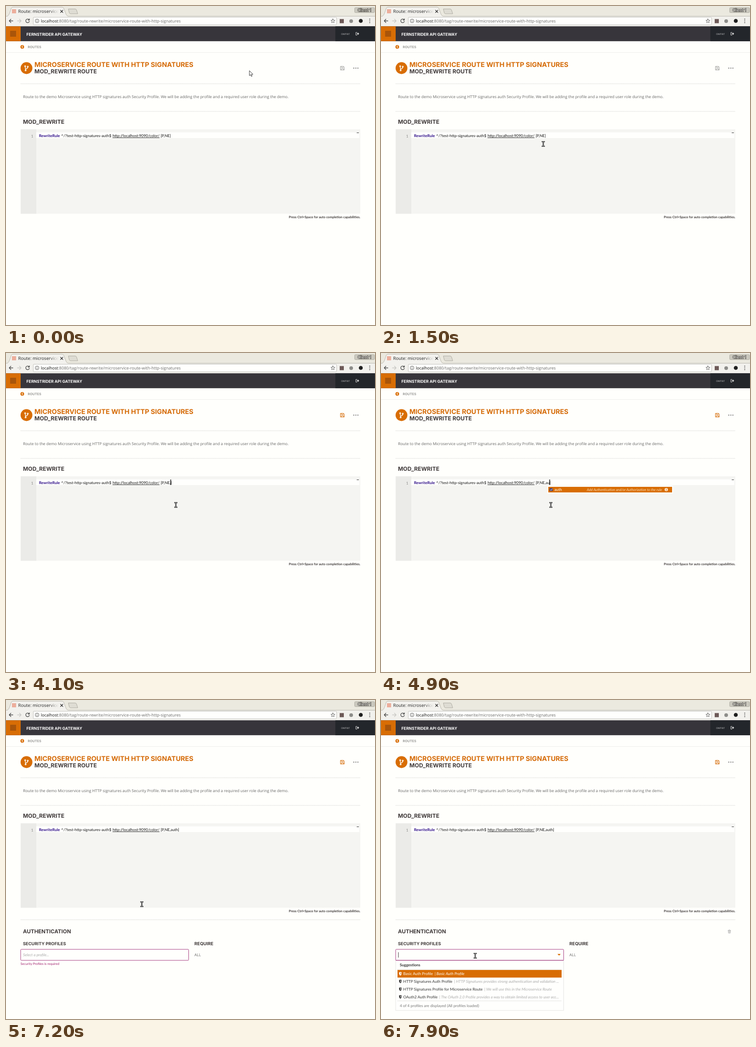
Animation of 805x696 px, one loop 8000 ms. Source, as an HTML page:

```html
<!DOCTYPE html>
<html lang="en">
<head>
<meta charset="utf-8">
<title>Route editor</title>
<style>
  html, body { margin: 0; width: 100%; height: 100%; overflow: hidden; background: #fffffc; }
  svg { display: block; width: 805px; height: 696px; text-rendering: geometricPrecision; }
  text { white-space: pre; }
  .head { font-family: Inter, sans-serif; font-weight: 700; fill: #413b3b; }
  .sans { font-family: "Open Sans", sans-serif; }
  .lato { font-family: Lato, sans-serif; font-size: 8.4px; fill: #111; }
  .b { font-weight: 700; }
  .i { font-style: italic; }
  .dots { stroke: #c9c9c6; stroke-width: 1; stroke-dasharray: 1.2 1.2; }
  .line { fill: none; stroke-linecap: round; stroke-linejoin: round; }
</style>
</head>
<body>
<svg viewBox="0 0 805 696">
  <defs>
    <linearGradient id="fade" gradientUnits="userSpaceOnUse" x1="94" x2="114" y1="0" y2="0">
      <stop stop-color="#222"/><stop offset="1" stop-color="#222" stop-opacity="0"/>
    </linearGradient>
    <g id="floppy" class="line" stroke="currentColor">
      <path d="M-4-4H2.4L4-2.4V4H-4Z M-2.2-4V-1.2H1.8V-4 M-2.4 4V1.2H2.4V4"/>
    </g>
    <path id="shield" d="M-2.8-3.4Q0-3.4 0-4Q0-3.4 2.8-3.4V0Q2.6 2.6 0 4Q-2.6 2.6-2.8 0Z"/>
    <path id="ibeam" d="M-2.3-5Q0-5 0-3.8Q0-5 2.3-5M0-4V4M-2.3 5Q0 5 0 3.8Q0 5 2.3 5"/>
  </defs>

  <!-- browser frame -->
  <rect width="805" height="22" fill="#ebe9df"/>
  <rect y="22" width="805" height="22.5" fill="#f2f1ed"/>
  <path d="M0 22.3H3Q6 21 8 15L11 6Q12 2.5 15 2.5H122Q125 2.5 126.5 6L131 18Q133 22.3 136 22.3H805" fill="#f2f1ed" stroke="#b5b2a8" stroke-width=".9"/>
  <path d="M136 6.5H151Q153 6.5 154 9L156.5 17H141Q139 17 138 15Z" fill="#dedcd3" stroke="#aaa79d" stroke-width=".9"/>
  <rect x="13" y="7" width="9" height="9" fill="#ecae9c"/>
  <text class="sans" x="26.5" y="15" font-size="9.6" fill="url(#fade)">Route: microservice</text>
  <path class="line" d="M119 9.3L124 14.3M124 9.3L119 14.3" stroke="#333" stroke-width="1.4"/>
  <rect x="760.5" y="3.5" width="43.5" height="11" rx="2" fill="#cbc9bf" stroke="#aaa79d" stroke-width=".8"/>
  <text id="badge" class="sans" x="782.5" y="12.3" font-size="8.8" text-anchor="middle" stroke="#55524b" stroke-width="1.8" paint-order="stroke">Client 1</text>

  <g class="line" stroke="#4a4a4a" stroke-width="1.3">
    <path d="M15 32.5H7M10.7 28.7L7 32.5L10.7 36.2"/>
    <path d="M25 32.5H33M29.3 28.7L33 32.5L29.3 36.2" stroke="#c9c8c4"/>
    <path d="M50.4 30A4 4 0 1 0 51 33.5M51 28V30.8H48"/>
  </g>
  <rect x="59.5" y="24.5" width="661.5" height="16.5" rx="1.5" fill="#fffffd" stroke="#bebdb8" stroke-width=".9"/>
  <circle cx="67.8" cy="32.5" r="4" fill="none" stroke="#555"/>
  <path d="M67.8 31.8V34.8M67.8 30V30.9" stroke="#555"/>
  <text class="sans" x="76" y="35.6" font-size="9" fill="#6a6a6a"><tspan fill="#111">localhost</tspan>:8080/tag/route-rewrite/microservice-route-with-http-signatures</text>
  <path class="line" d="M713.2 28L714.4 31.1L717.6 31.3L715.1 33.4L715.9 36.6L713.2 34.8L710.5 36.6L711.3 33.4L708.8 31.3L712 31.1Z" stroke="#555" stroke-width=".9"/>
  <rect x="728" y="28.5" width="9" height="9" fill="#6d5957"/>
  <circle cx="753" cy="33" r="4" fill="#8d8d8a"/>
  <circle cx="774" cy="32.5" r="4.3" fill="#1f1f1f"/>
  <g fill="#555"><circle cx="793.5" cy="28.7" r="1.1"/><circle cx="793.5" cy="32.5" r="1.1"/><circle cx="793.5" cy="36.3" r="1.1"/></g>

  <!-- app header -->
  <rect y="44.3" width="805" height="32.5" fill="#37353b"/>
  <rect x="718.5" y="44.3" width="86.5" height="32.5" fill="#23262b"/>
  <rect y="44.3" width="32" height="32.5" fill="#d86d04"/>
  <rect x="9" y="54" width="13" height="13" fill="#a9550a"/>
  <text class="head" x="44.5" y="64.7" font-size="8.7" style="fill:#fff">FERNSTRIDER API GATEWAY</text>
  <text class="sans" x="731" y="63" font-size="6.5" fill="#b4b4b6">owner</text>
  <path class="line" d="M765.5 57.6H763.3V63.6H765.5" stroke="#ddd"/>
  <path d="M765.4 59.6H767.4V57.6L770.4 60.6L767.4 63.6V61.6H765.4Z" fill="#ddd"/>
  <path d="M0 101.5H805" stroke="#eeeeea"/>
  <circle cx="35.5" cy="89.2" r="4" fill="#d86d04"/>
  <path class="line" d="M36.4 87.2L34.5 89.2L36.4 91.2" stroke="#fff" stroke-width="1.1"/>
  <text class="head" x="47.5" y="91.8" font-size="7.2" style="fill:#9b9b99">ROUTES</text>

  <!-- title -->
  <circle cx="44.7" cy="135.5" r="12.9" fill="#d86d04"/>
  <g class="line" stroke="#fff" stroke-width="1.4">
    <circle cx="41.8" cy="131.3" r="1.2"/><circle cx="47.5" cy="132.3" r="1.2"/><circle cx="42.8" cy="140.4" r="1.2"/>
    <path d="M42 132.8L42.7 139M47.5 133.6Q47.3 136 44.8 136.6Q42.8 137.2 42.7 139"/>
  </g>
  <text class="head" x="62" y="132.6" font-size="14.5" style="fill:#d56a05">MICROSERVICE ROUTE WITH HTTP SIGNATURES</text>
  <text class="head" x="62" y="146.8" font-size="12.3">MOD_REWRITE ROUTE</text>
  <use id="save" href="#floppy" x="734" y="135.7"/>
  <g fill="#999"><circle cx="758.7" cy="135.6" r="1.4"/><circle cx="763.2" cy="135.6" r="1.4"/><circle cx="767.7" cy="135.6" r="1.4"/></g>
  <path class="dots" d="M32 169.7H773M32 230H773"/>
  <text class="sans" x="37.3" y="201.4" font-size="8.45" fill="#666">Route to the demo Microservice using HTTP signatures auth Security Profile. We will be adding the profile and a required user role during the demo.</text>

  <!-- editor -->
  <text class="head" x="37" y="256.7" font-size="12.2">MOD_REWRITE</text>
  <rect x="32" y="269" width="741" height="184.3" fill="#f5f5f2"/>
  <rect x="32" y="269" width="34" height="184.3" fill="#ebebe8"/>
  <rect x="66" y="275.7" width="705" height="12.4" fill="#fffffd"/>
  <path d="M765 276.6H770" stroke="#444" stroke-width="1.1"/>
  <text class="lato" x="54.7" y="286.6" style="fill:#8a8a88">1</text>
  <text class="lato b" x="72" y="286" style="fill:#2b0a86">RewriteRule</text>
  <text class="lato" x="120.3" y="286">^/?test-http-signatures-auth$</text>
  <text class="lato" x="232.4" y="286" text-decoration="underline">http://localhost:9090/color/</text>
  <text class="lato" id="flags" x="337.2" y="286"></text>
  <rect id="caret" y="276" width="1.4" height="12" fill="#000"/>
  <text class="lato b" x="773" y="463" text-anchor="end" style="font-size:7.1px;fill:#3c3737">Press Ctrl+Space for auto completion capabilities.</text>

  <g id="popup">
    <rect x="-2" y="289.7" width="274" height="16.8" fill="#fffffd"/>
    <rect y="292" width="270" height="12.2" fill="#d86d04"/>
    <rect x="2.6" y="294.8" width="7.2" height="6.4" rx="1" fill="#4a4370"/>
    <path class="line" d="M4.4 298.4L6 299.8L8.6 296.4" stroke="#fff" stroke-width=".9"/>
    <text id="match" class="lato" x="13.2" y="301" style="fill:#fff">auth</text>
    <text class="lato i" x="84" y="300.8" style="font-size:7.65px;fill:#f7dcc0">Add Authentication and/or Authorization to the rule</text>
    <circle cx="257.3" cy="298" r="3.6" fill="#fbe6d0"/>
    <path d="M257.3 297.3V300.2M257.3 295.6V296.5" stroke="#d86d04" stroke-width="1.1"/>
  </g>

  <!-- authentication -->
  <g id="auth">
    <path class="dots" d="M32 479.5H773"/>
    <text class="head" x="37" y="509.2" font-size="11.6">AUTHENTICATION</text>
    <text class="head" x="37" y="534.8" font-size="9.3">SECURITY PROFILES</text>
    <text class="head" x="411" y="534.8" font-size="9.6">REQUIRE</text>
    <text class="sans" x="411" y="558.7" font-size="8.4" fill="#666">ALL</text>
    <rect x="32" y="544" width="366.5" height="24" rx="1.5" fill="#fffffd" stroke="#a53a80"/>
    <text id="hint" class="lato i" x="37.3" y="559" style="fill:#aaa">Select a profile...</text>
    <text id="error" class="lato" x="31.7" y="578" style="font-size:7.1px;fill:#a0206e">Security Profiles is required</text>
  </g>
  <g id="trash" class="line" stroke="#aaa" stroke-width=".9">
    <path d="M757 503H763M758.8 503V501.8H761.2V503M757.6 503L758 508.6H762L762.4 503M759.2 504.6V507M760.8 504.6V507"/>
  </g>
  <g id="menu">
    <rect x="32" y="568.5" width="366.5" height="108.7" fill="#fffffd" stroke="#dededb" stroke-width=".8"/>
    <path d="M32 568H398.5" stroke="#a53a80"/>
    <path d="M38 550.3V562" stroke="#222" stroke-width=".9"/>
    <path d="M385 554H392L388.5 557.8Z" fill="#d86d04"/>
    <text class="lato b" x="41" y="581" style="fill:#333">Suggestions</text>
    <path class="dots" d="M36 587.8H394M36 656.5H394"/>
    <rect x="36" y="589" width="358" height="16.6" fill="#d86d04"/>
    <g id="rows"></g>
    <text class="lato" x="41" y="670" style="fill:#777">4 of 4 profiles are displayed (All profiles loaded)</text>
  </g>

  <!-- pointers -->
  <path id="arrow" d="M0 0V11L2.5 8.8L4.2 12.7L6 11.9L4.3 8.1H7.7Z" fill="#fff" stroke="#222" stroke-width=".9"/>
  <g id="beam" class="line">
    <use href="#ibeam" stroke="#222" stroke-width="2.6"/>
    <use href="#ibeam" stroke="#bbb" stroke-width=".8"/>
  </g>
</svg>
<script>
const LOOP = 8000;
const $ = id => document.getElementById(id);
const show = (id, on) => { $(id).style.display = on ? '' : 'none'; };
const move = (id, x, y) => $(id).setAttribute('transform', `translate(${x} ${y})`);

// Steps are [time, value...]; the last one reached holds.
const at = (steps, t) => steps.filter(s => s[0] <= t).pop();

const typed = [
  [0, ''], [2400, ','], [2500, ', '], [3000, ', a'], [3100, ', au'], [3700, ', a'], [3800, ', '],
  [4100, ','], [4600, ',a'], [4900, ',au'], [5300, ',aut'], [5400, ',auth']
];
const pointer = [
  [0, 531, 141], [500, 518, 150], [600, 474, 176], [700, 430, 208], [800, 390, 241],
  [900, 358, 268], [1000, 338, 283], [1100, 331, 287], [1300, 356, 284], [1400, 356, 288],
  [1500, 354, 301], [1600, 353, 311], [1800, 370.5, 331.5], [7200, 296.3, 445.5],
  [7400, 275, 476], [7500, 240, 520], [7600, 213, 550], [7700, 205.5, 558]
];
const caretOn = [[0, false], [1600, true], [6100, false], [6400, true], [7200, false]];
const popupX = [[0, 361], [4900, 365], [5300, 369], [5400, 373]];

const profiles = [
  ['Basic Auth Profile', 117, 'Basic Auth Profile'],
  ['HTTP Signatures Auth Profile', 159.5, 'HTTP Signatures provides strong authentication and validation ...'],
  ['HTTP Signatures Profile for Microservice Route', 225.5, 'We will use this in the Microservice Route'],
  ['OAuth2 Auth Profile', 127, 'The OAuth 2.0 Profile provides a way to obtain limited access to user acc...']
];
$('rows').innerHTML = profiles.map(([name, x, note], i) => {
  const y = 597.3 + i * 16.8;
  const [ink, pale] = i ? ['#333', '#aaa'] : ['#fff', '#fff'];
  return `<use href="#shield" x="42.3" y="${y}" fill="${ink}"/>
    <path d="M42.6 ${y - 2.4}V${y + 2.6}Q44.2 ${y + 1.4} 44.2 ${y - 2.4}Z" fill="${i ? '#fffffd' : '#d86d04'}"/>
    <text class="lato" x="48.5" y="${y + 3}" style="fill:${ink}">${name}</text>
    <text class="lato i" x="${x}" y="${y + 3}" style="fill:${pale}">| ${note}</text>`;
}).join('');

function draw(t) {
  const before = ('[P,NE' + at(typed, t)[1]).replace(/ /g, '\u00a0');
  const flags = $('flags');
  if (flags.textContent !== before + ']') flags.textContent = before + ']';
  $('caret').setAttribute('x', flags.getEndPositionOfChar(before.length - 1).x - 0.3);
  show('caret', at(caretOn, t)[1]);

  show('popup', t >= 4700 && t < 6400);
  move('popup', at(popupX, t)[1], 0);
  $('match').style.fontWeight = t >= 5400 ? 700 : 400;

  const open = t >= 7800;
  show('auth', t >= 5500);
  show('hint', !open);
  show('error', !open);
  show('menu', open);
  show('trash', t >= 7500);
  $('save').style.color = t >= 2400 ? '#d56a05' : '#a3a3a1';
  $('badge').style.fill = t >= 1500 ? '#fff' : '#eceae3';

  const [, x, y] = at(pointer, t);
  const inEditor = y > 269 && y < 453;
  const inField = y > 544;
  show('beam', inEditor || inField);
  show('arrow', !inEditor && !inField);
  move('beam', x, y);
  move('arrow', x, y);
}

function tick() {
  draw(performance.now() % LOOP);
  requestAnimationFrame(tick);
}
tick();
</script>
</body>
</html>
```
